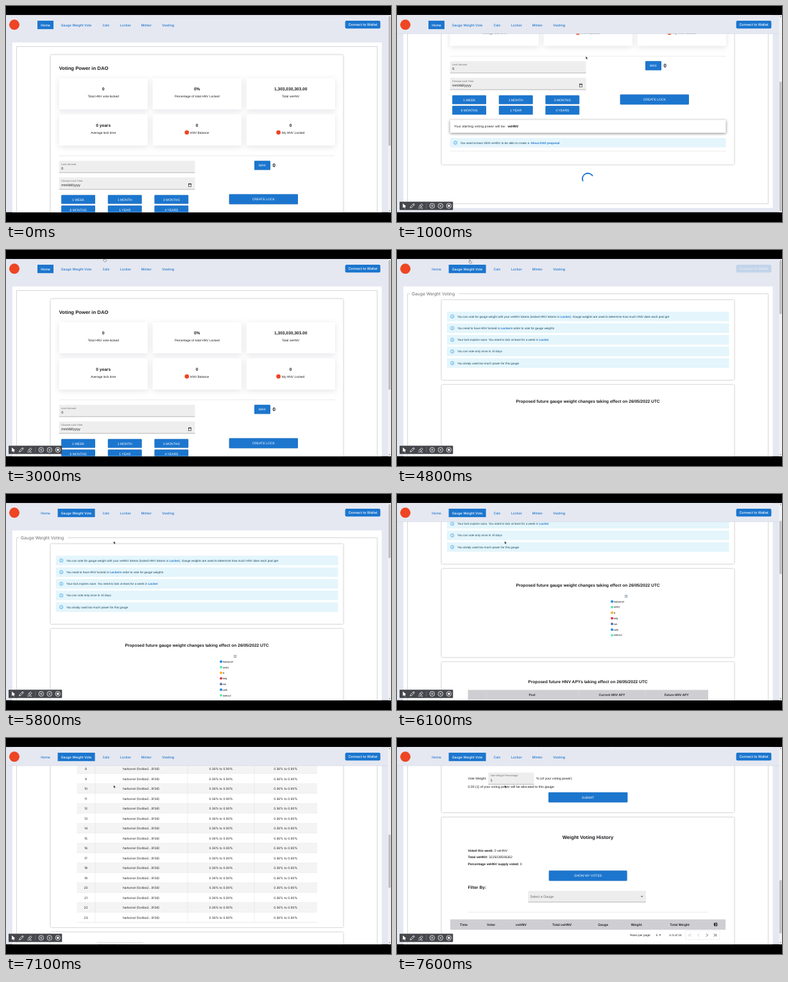
An HTML page for the animation above (8000 ms loop, 600 by 338 pixels).

```html
<!DOCTYPE html>
<html lang="en">
<head>
<meta charset="utf-8">
<title>Voting dashboard</title>
<style>
html, body { margin: 0; width: 100%; height: 100%; overflow: hidden; background: #000; }
svg { display: block; width: 100vw; height: 100vh; }
text { font-family: "Liberation Sans", Arial, sans-serif; fill: #1b1c20; white-space: pre; text-rendering: geometricPrecision; }
.ui { font-family: Inter, "Open Sans", sans-serif; }
.mid { text-anchor: middle; }
.bold, .b { font-weight: 700; }
.semi { font-weight: 600; }
.med { font-weight: 500; }
.link, .note .b { fill: #1c74cc; }
.note { fill: #14465c; }
.white { fill: #fff; }
.dim { fill: #6c6c70; }
.panel { fill: #fff; filter: drop-shadow(0 .8px 1.1px rgba(0,0,0,.38)); }
.card { fill: #fff; filter: drop-shadow(0 2px 4px rgba(30,35,60,.13)); }
.btn { fill: #1c76ce; filter: drop-shadow(0 .6px .6px rgba(0,0,0,.3)); }
</style>
</head>
<body>
<script>
const NS = 'http://www.w3.org/2000/svg';
const BLUE = '#1c76ce';
const LOOP = 8000, STEP = 100;

function el(parent, tag, attrs = {}) {
  const node = document.createElementNS(NS, tag);
  for (const k in attrs) node.setAttribute(k, attrs[k]);
  parent.appendChild(node);
  return node;
}
const group = (p, attrs) => el(p, 'g', attrs);
const box = (p, x1, y1, x2, y2, attrs) =>
  el(p, 'rect', { x: x1, y: y1, width: x2 - x1, height: y2 - y1, ...attrs });
const line = (p, d, stroke, width = .6, attrs) =>
  el(p, 'path', { d, stroke, 'stroke-width': width, fill: 'none', ...attrs });
const disc = (p, cx, cy, r, fill, attrs) => el(p, 'circle', { cx, cy, r, fill, ...attrs });

// Words between asterisks are set bold.
function text(p, x, y, size, str, cls = '') {
  const node = el(p, 'text', { x, y, 'font-size': size, class: cls });
  str.split('*').forEach((part, i) => {
    if (part) el(node, 'tspan', i % 2 ? { class: 'b' } : {}).textContent = part;
  });
  return node;
}
const panel = (p, x1, y1, x2, y2) => box(p, x1, y1, x2, y2, { class: 'panel', rx: 1 });
const rule = (p, x1, x2, y) => line(p, `M${x1} ${y}H${x2}`, '#dedee2');

function button(p, x1, y1, x2, y2, label, size = 5.05) {
  box(p, x1, y1, x2, y2, { class: 'btn', rx: 1.2 });
  text(p, (x1 + x2) / 2, (y1 + y2) / 2 + 1.8, size, label, 'mid white');
}
function field(p, x1, y1, x2, y2, label, value) {
  box(p, x1, y1, x2, y2, { fill: '#eeeeee', rx: 1 });
  line(p, `M${x1} ${y2}H${x2}`, '#8c8c8c');
  text(p, x1 + 3.4, y1 + 6.2, 4, label, 'dim');
  text(p, x1 + 3.6, y1 + 13.7, 5.5, value);
}
function note(p, x1, y1, x2, y2, str, gap) {
  const y = (y1 + y2) / 2, x = x1 + 8.4;
  box(p, x1, y1, x2, y2, { fill: '#e4f5fc', rx: 1 });
  disc(p, x, y, 2.6, 'none', { stroke: '#2a9fe0', 'stroke-width': .7 });
  line(p, `M${x} ${y - 1.5}v.7M${x} ${y - .3}v1.8`, '#2a9fe0', .7);
  text(p, x1 + gap, y + 1.6, 4.62, str, 'note');
}
function frame(p, top, bottom, legendEnd) {
  box(p, 10, 57, 585.5, bottom + 6.5, { fill: '#fff' });
  const start = legendEnd ? `M20 ${top}H16.5` : `M${legendEnd || 16.5} ${top}`;
  line(p, legendEnd
    ? `${start}V${bottom}H578.5V${top}H${legendEnd}`
    : `${start}H578.5V${bottom}H16.5Z`, '#b9bbc0');
}

const svg = el(document.body, 'svg', { viewBox: '0 0 600 338', preserveAspectRatio: 'none' });
const defs = el(svg, 'defs');
box(el(defs, 'clipPath', { id: 'view' }), 0, 14.3, 600, 322.7);
const stage = group(svg, { 'clip-path': 'url(#view)' });
box(stage, 0, 14, 600, 323, { fill: '#e5e8f1' });

// Home page
const home = group(stage);
frame(home, 63.5, 465.5);
panel(home, 69.5, 76.5, 525.5, 404);
text(home, 82.7, 100, 7.7, 'Voting Power in DAO', 'bold');
const cards = [
  ['0', 'Total HNV vote-locked'], ['0%', 'Percentage of total HNV Locked'],
  ['1,303,030,303.00', 'Total veHNV'], ['0 years', 'Average lock time'],
  ['0', 'HNV Balance', 1], ['0', 'My HNV Locked', 1]
];
cards.forEach(([value, label, mark], i) => {
  const x = 82.5 + (i % 3) * 146, y = i < 3 ? 112.7 : 169.4, mid = x + 69.2;
  box(home, x, y, x + 138.4, y + 49, { class: 'card', rx: 1.5 });
  text(home, mid, y + 19.4, 6.6, value, 'mid bold');
  text(home, mid + (mark ? 3.9 : 0), y + 30.2, 4.93, label, 'mid');
  if (mark) disc(home, i === 4 ? 281.8 : 424.6, y + 28.4, 3.4, '#ee4523');
});
rule(home, 82.5, 512.5, 234.5);
field(home, 82.7, 242.3, 294.5, 260.8, 'Lock Amount', '0');
field(home, 82.7, 268.3, 294.5, 287, 'Choose Lock Time', 'mm/dd/yyyy');
box(home, 284.3, 278.3, 288.7, 282.8, { fill: 'none', stroke: '#222', 'stroke-width': .6 });
line(home, 'M284 278.8H289M285.3 277.3v1M287.7 277.3v1', '#222', .9);
button(home, 387, 242.2, 412, 256.6, 'MAX');
text(home, 417.7, 252.3, 8, '0', 'mid bold');
['1 WEEK', '1 MONTH', '3 MONTHS', '6 MONTHS', '1 YEAR', '4 YEARS'].forEach((label, i) => {
  const x = 86.2 + (i % 3) * 72.6, y = i < 3 ? 295.8 : 312.3;
  button(home, x, y, x + 52.8, y + 13.8, label);
});
button(home, 347.7, 294.4, 455, 310.2, 'CREATE LOCK');
box(home, 82.7, 334.3, 512.5, 354.5, { class: 'panel', rx: 1, style: 'filter:drop-shadow(0 1px 2px rgba(0,0,0,.5))' });
text(home, 89, 346.2, 5, 'Your starting voting power will be:  *veHNV*', 'ui');
note(home, 82.7, 362.6, 512.5, 377.2, 'You need at least 2500 veHNV to be able to create a  *Hinva DAO proposal*', 15.8);
rule(home, 82.5, 512.5, 383);
const spinner = line(home, '', BLUE, 1.9);

// Gauge page
const gauge = group(stage);
frame(gauge, 68.5, 1112, 96);
text(gauge, 23, 70.9, 6.75, 'Gauge Weight Voting', 'ui dim');
panel(gauge, 69.5, 78.3, 525.5, 203.2);
[
  'You can vote for gauge weight with your veHNV tokens (locked HNV tokens in *Locker*). Gauge weights are used to determine how much HNV does each pool get',
  'You need to have HNV locked in *Locker*in order to vote for gauge weights',
  'Your lock expires soon. You need to lock at least for a week in *Locker*',
  'You can vote only once in 10 days',
  'You alrady used too much power for this gauge'
].forEach((str, i) => note(gauge, 77.8, 96.5 + i * 18.25, 517.5, 111.6 + i * 18.25, str, 16.2));

const DATE = 'taking effect on 26/05/2022 UTC';
panel(gauge, 69.5, 211, 525.5, 349.3);
text(gauge, 297.5, 239.3, 6.6, 'Proposed future gauge weight changes ' + DATE, 'mid bold');
const legend = group(gauge);
line(legend, 'M354.7 252.4h4.8m-4.8 1.6h4.8m-4.8 1.6h4.8', '#6e8192', .7);
const pools = [
  ['harbonel', '#1787e8'], ['ombt', '#4fe8ae'], ['q', '#f5b02a'], ['tolq', '#dc3545'],
  ['ruk', '#5a6da8'], ['zelk', '#1f8be6'], ['melov2', '#5cebaa']
];
pools.forEach(([name, color], i) => {
  const y = 262.2 + i * 8.8;
  disc(legend, 335.1, y, 2, color);
  text(legend, 337.7, y + 1.5, 4.1, name);
});

panel(gauge, 69.5, 357, 525.5, 796);
text(gauge, 297.5, 390, 6.6, 'Proposed future HNV APYs ' + DATE, 'mid bold');
box(gauge, 110.5, 400.6, 485, 416.6, { fill: '#cfcfd3' });
const cols = [210.5, 335, 435.7];
['Pool', 'Current HNV APY', 'Future HNV APY'].forEach((s, i) =>
  text(gauge, cols[i], 410.2, 4.8, s, 'mid ui semi'));
for (let i = 0; i < 24; i++) {
  const y = 416.6 + i * 15.5;
  box(gauge, 110.5, y, 485, y + 15.5, { fill: i % 2 ? '#fff' : '#f4f4f5' });
  rule(gauge, 110.5, 485, y + 15.5);
  ['harbonel (0x4be2...9136)', '0.36% to 0.90%', '0.36% to 0.90%'].forEach((s, j) =>
    text(gauge, cols[j], y + 9.5, 4.8, s, 'mid ui'));
  text(gauge, 124.5, y + 9.5, 4.8, String(i), 'mid ui');
}
line(gauge, 'M139 400.6V788.6M283 400.6V788.6M387 400.6V788.6', '#dedee2', .5);

// Lower part of the gauge page, laid out from its own top
const low = group(gauge, { transform: 'translate(0 765)' });
panel(low, 69.5, 39, 525.5, 116.3);
text(low, 110.5, 64.5, 5.15, 'Vote Weight:');
field(low, 142, 54, 213.5, 72.4, 'Vote Weight Percentage', '1');
text(low, 217, 64.5, 5.15, '% (of your voting power)');
text(low, 110.5, 77.6, 5.15, '0.00 (1) of your voting power will be allocated to this gauge.');
button(low, 236, 85, 359.3, 100.8, 'SUBMIT');
panel(low, 69.5, 124.3, 525.5, 336);
text(low, 297.5, 158, 7.7, 'Weight Voting History', 'mid bold');
['*Voted this week:* 0 veHNV', '*Total veHNV:* 3225028506362', '*Percentage veHNV supply voted:* 0']
  .forEach((s, i) => text(low, 110.5, 177.8 + i * 10.4, 5.1, s));
button(low, 236.7, 207.5, 358.5, 223.4, 'SHOW MY VOTES');
text(low, 110.5, 236.1, 6.6, 'Filter By:', 'bold');
box(low, 204.3, 239.3, 388, 256.8, { fill: '#ededee', rx: 1 });
line(low, 'M204.3 256.8H388', '#8c8c8c');
text(low, 207.6, 249.8, 5.3, 'Select a Gauge', 'dim');
el(low, 'path', { d: 'M379.7 247.2h4l-2 2.1z', fill: '#666' });
rule(low, 110.5, 485, 272.5);
box(low, 83, 283.8, 512, 300, { fill: '#cfcfd3' });
[['Time', 104], ['Voter', 146.7], ['veHNV', 193.4], ['Total veHNV', 257], ['Gauge', 321.3],
 ['Weight', 373], ['Total Weight', 440.4]].forEach(([s, x]) => text(low, x, 293.6, 5.05, s, 'mid ui semi'));
disc(low, 496.6, 291.8, 3, '#333');
line(low, 'M496.6 288.8V294.8M496.6 291.8H499.6', '#cfcfd3', .7);
text(low, 363.2, 310.3, 4.65, 'Rows per page:');
text(low, 403.6, 310.3, 4.65, '5');
el(low, 'path', { d: 'M408.2 307.6h3.4l-1.7 1.8z', fill: '#555' });
text(low, 424, 310.3, 4.65, '1–5 of 24');
box(low, 450, 301.3, 503, 315.5, { fill: '#fff', stroke: '#e4e4e7', 'stroke-width': .6 });
line(low, 'M455 306.3v4.4M458.6 306.3l-2.2 2.2 2.2 2.2M471 306.3l-2.2 2.2 2.2 2.2', '#b5b5b8', .7);
line(low, 'M482 306.3l2.2 2.2-2.2 2.2M493.6 306.3l2.2 2.2-2.2 2.2M497.2 306.3v4.4', '#333', .8);

// Fixed header
box(stage, 0, 14, 595.5, 43.2, { fill: '#e5e8f1' });
const edge = line(stage, 'M0 43.3H595.5', '#cdd1dc', .6);
disc(stage, 13, 29.3, 8, '#ee4523');
const tabMark = box(stage, 49, 23, 74, 36.2, { fill: BLUE });
const tabs = [['Home', 61.5], ['Gauge Weight Vote', 109.5], ['Calc', 156], ['Locker', 186.4],
  ['Minter', 218.7], ['Vesting', 252.7]].map(([s, x]) => text(stage, x, 31.5, 5.2, s, 'mid ui med link'));
const wallet = group(stage);
box(wallet, 528.6, 23, 583.4, 35.2, { fill: BLUE, rx: 2 });
text(wallet, 556, 30.9, 5.35, 'Connect to Wallet', 'mid ui med white');

// Scrollbar
box(stage, 595.5, 14, 600, 323, { fill: '#f1f1f2' });
el(stage, 'path', { d: 'M596.6 17.2l1.2-1.4 1.2 1.4zM596.6 319.8l1.2 1.4 1.2-1.4z', fill: '#777' });
const thumb = box(stage, 596, 17, 599.5, 18, { fill: '#c0c0c2' });

// Recorder toolbar
const bar = group(stage);
box(bar, 4, 306.2, 87.3, 319.3, { fill: '#45474c', rx: 1 });
el(bar, 'path', { d: 'M9 309l.2 7 1.7-1.6 1.2 2.3 1.1-.6-1.1-2.2 2.2-.3z', fill: '#fff' });
line(bar, 'M20.6 316l.6-2.2 4.6-4.6 1.6 1.6-4.6 4.6zM25 310l1.6 1.6', '#fff', .8);
line(bar, 'M33.8 314.2l4.4-4.6 2 2-4.5 4.5h-2.5M35.8 312l2.2 2.2M36.8 316.2h3.4', '#fff', .8);
line(bar, 'M45.8 308.5v8.5', '#85878b', .6);
[54.8, 67.8, 80.8].forEach(x => disc(bar, x, 312.7, 3.8, 'none', { stroke: '#fff', 'stroke-width': .8 }));
line(bar, 'M53.9 311.1v3.2M55.7 311.1v3.2M66.5 311.4l2.6 2.6M69.1 311.4l-2.6 2.6', '#fff', .8);
box(bar, 79.2, 311.1, 82.4, 314.3, { fill: '#fff' });

const arrow = el(stage, 'path', {
  d: 'M0 0V4.4L1 3.5 1.7 5 2.4 4.7 1.7 3.2H3.1Z', fill: '#111', stroke: '#fff', 'stroke-width': .3
});
const hand = el(stage, 'path', {
  d: 'M0 0q.6-.5 1 0V2.1L3.2 2.6q.5.2.4.8L3.1 5.4H.4L-1.2 3.2q.2-.7 1.2 0Z',
  fill: '#fff', stroke: '#222', 'stroke-width': .45
});

// Keys are [time, value, ...]; each stretch eases in and out.
function track(keys, t) {
  let i = 0;
  while (i < keys.length - 2 && t >= keys[i + 1][0]) i++;
  const a = keys[i], b = keys[i + 1];
  const u = Math.min(1, Math.max(0, (t - a[0]) / (b[0] - a[0])));
  const e = u * u * (3 - 2 * u);
  return a.slice(1).map((v, k) => v + (b[k + 1] - v) * e);
}
const scrollKeys = [[600, 0], [1000, 156], [1500, 156], [2000, 0], [5800, 0], [6500, 239],
  [6800, 239], [7100, 500], [7400, 500], [7600, 765]];
const cursorKeys = [[2300, 294.3, 78.8], [3000, 152.8, 12.6], [3300, 113, 15.4],
  [4900, 113, 15.4], [5600, 167.8, 73.8]];

function arc(t) {
  const phase = (t - 1000) / 1400 * 2 * Math.PI;
  const half = 1.55 + .85 * Math.sin(phase);
  const mid = 4.22 + phase;
  const at = a => `${297.5 + 8.6 * Math.cos(a)} ${426.3 + 8.6 * Math.sin(a)}`;
  return `M${at(mid - half)}A8.6 8.6 0 ${half > Math.PI / 2 ? 1 : 0} 1 ${at(mid + half)}`;
}
const show = (node, on) => node.setAttribute('display', on ? 'inline' : 'none');

function draw(t) {
  const onGauge = t >= 4800;
  const [scroll] = track(scrollKeys, t);
  const [x, y] = track(cursorKeys, t);
  const height = onGauge ? 1128 : 465;

  show(home, !onGauge);
  show(gauge, onGauge);
  (onGauge ? gauge : home).setAttribute('transform', `translate(0 ${-scroll})`);
  show(legend, t >= 5400);
  show(edge, scroll > 0);
  spinner.setAttribute('d', arc(t));

  tabMark.setAttribute('x', onGauge ? 80.6 : 49);
  tabMark.setAttribute('width', onGauge ? 58 : 25);
  tabs.forEach((tab, i) => { tab.style.fill = i === +onGauge ? '#fff' : ''; });
  wallet.setAttribute('opacity', onGauge ? track([[4800, .17], [5100, 1]], t)[0] : 1);

  thumb.setAttribute('y', 17 + scroll * 303 / height);
  thumb.setAttribute('height', 303 * 309 / height);

  show(bar, t >= 100);
  const pointing = y < 34;
  show(arrow, t >= 700 && !pointing);
  show(hand, pointing);
  (pointing ? hand : arrow).setAttribute('transform', `translate(${x} ${y})`);
}

const start = performance.now();
function tick() {
  const t = (performance.now() - start) % LOOP;
  draw(Math.floor(t / STEP) * STEP);
  requestAnimationFrame(tick);
}
tick();
</script>
</body>
</html>
```
